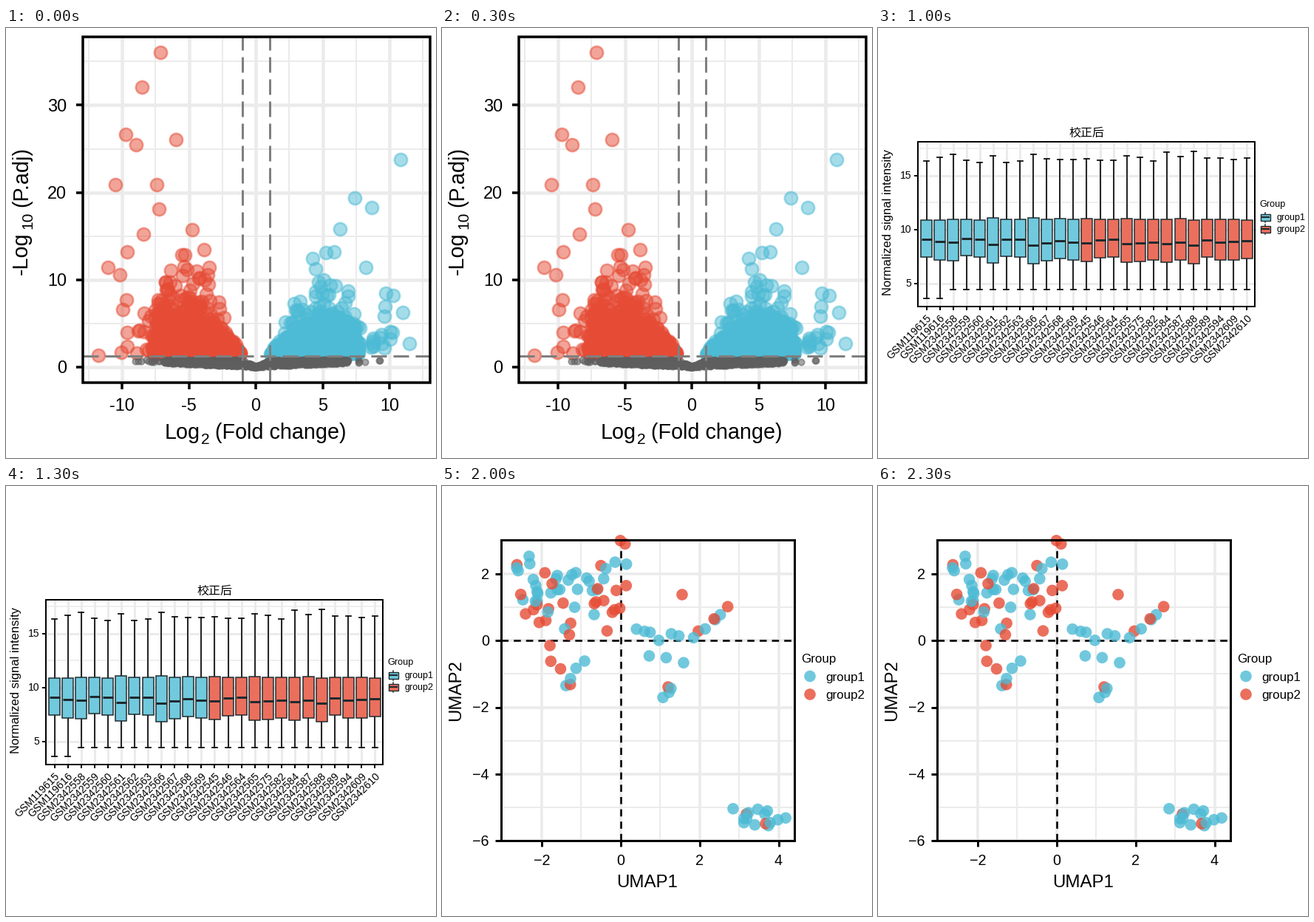
A matplotlib script that plays this animation: 582x582 px, repeating every 2.5 s.

```python
import numpy as np
import matplotlib.pyplot as plt
from matplotlib.animation import FuncAnimation
from matplotlib.colors import LinearSegmentedColormap, to_rgba
from matplotlib.patches import Rectangle

SIZE, DPI = 582, 96
PT = 72 / DPI
RED, BLUE, GRID = "#E64B35", "#4DBBD5", "#EBEBEB"
DIVERGING = LinearSegmentedColormap.from_list("div", [BLUE, "white", RED])

plt.rcParams["font.family"] = "Liberation Sans"
fig = plt.figure(figsize=(SIZE / DPI, SIZE / DPI), dpi=DPI, facecolor="white")


# ---------- helpers, all in pixels with y pointing down ----------
def new_scene():
    ax = fig.add_axes([0, 0, 1, 1], label=f"scene{len(fig.axes)}")
    ax.set_xlim(0, SIZE)
    ax.set_ylim(SIZE, 0)
    ax.axis("off")
    return ax


def line(ax, xs, ys, width, color="black", z=2, **kw):
    ax.plot(xs, ys, color=color, lw=width * PT, zorder=z, **kw)


def text(ax, x, y, s, size, ha="left", **kw):
    ax.text(x, y, s, fontsize=size * PT, ha=ha, va="baseline",
            rotation_mode="anchor", zorder=10, **kw)


def middle(ax, x, cy, s, size, ha="left"):
    text(ax, x, cy + 0.35 * size, s, size, ha)


def rect(ax, x0, y0, x1, y1, face="none", edge="none", width=0, z=3):
    ax.add_patch(Rectangle((x0, y0), x1 - x0, y1 - y0, facecolor=face,
                           edgecolor=edge, lw=width * PT, zorder=z))


def dots(ax, pts, r, face, edge="none", width=0, z=4):
    xs, ys = np.asarray(pts, float).T
    ax.scatter(xs, ys, s=(2 * r * PT) ** 2, facecolors=np.atleast_2d(face),
               edgecolors=edge, linewidths=width * PT, zorder=z)


def along(rng, knots, n, sx, sy):
    """Points strewn along a line through a few knots."""
    xs, ys = np.array(knots, float).T
    t, k = np.linspace(0, len(knots) - 1, n), np.arange(len(knots))
    return np.column_stack([np.interp(t, k, xs) + rng.normal(0, sx, n),
                            np.interp(t, k, ys) + rng.normal(0, sy, n)])


def mixed_dots(ax, rng, blue, red):
    pts = np.vstack([blue, red])
    colors = np.repeat([to_rgba(BLUE, 0.8), to_rgba(RED, 0.8)],
                       [len(blue), len(red)], axis=0)
    order = rng.permutation(len(pts))
    dots(ax, pts[order], 7.8, colors[order])


def grid(ax, box, xs, ys, width):
    x0, y0, x1, y1 = box
    for x in xs:
        line(ax, [x, x], [y0, y1], width, GRID, 1)
    for y in ys:
        line(ax, [x0, x1], [y, y], width, GRID, 1)


def panel(ax, box, border, xticks, yticks, size, tick, gap):
    x0, y0, x1, y1 = box
    rect(ax, *box, edge="black", width=border, z=8)
    for x, label in xticks:
        line(ax, [x, x], [y1, y1 + tick], border, z=8, solid_capstyle="butt")
        if label:
            text(ax, x, y1 + tick + 1.25 * size, label, size, "center")
    for y, label in yticks:
        line(ax, [x0 - tick, x0], [y, y], border, z=8, solid_capstyle="butt")
        middle(ax, x0 - tick - gap, y, label, size, "right")


def ticks(values, origin, step):
    return [(origin + v * step, str(v).replace("-", "\u2212")) for v in values]


def places(values, origin, step):
    return [origin + v * step for v in values]


def group_legend(ax, x, y, title, label_x, label_ys, size):
    middle(ax, x, y, "Group", title)
    for i, ly in enumerate(label_ys):
        middle(ax, label_x, ly, f"group{i + 1}", size)


# ---------- volcano plot ----------
def wing(rng, side, n, peak):
    """One side of the volcano: a dense body and a thin outer fringe."""
    body = 20 + 120 * rng.beta(1.4, 1.2, n)
    height = rng.exponential(peak / 3.6 * np.sin(np.pi * (body - 20) / 150))
    fringe = rng.uniform(125, 185, 22)
    dx = np.append(body, fringe)
    rise = np.append(height, rng.exponential(38, 22))
    return np.column_stack([338 + side * dx, 441 - rise])


def volcano():
    ax, rng = new_scene(), np.random.default_rng(7)
    box = (104, 11.5, 573.5, 480)
    grid(ax, box, places(np.arange(-12.5, 13, 5), 338, 18.1),
         places([5, 15, 25, 35], 459, -11.82), 2)
    xt = [(338 + 18.1 * v, str(v)) for v in (-10, -5, 0, 5, 10)]
    yt = ticks([0, 10, 20, 30], 459, -11.82)
    grid(ax, box, [x for x, _ in xt], [y for y, _ in yt], 4.5)
    panel(ax, box, 3.5, xt, yt, 23.5, 9, 13)

    red = [(209, 33), (184, 80), (162, 144), (176, 158), (230, 151), (148, 212),
           (204, 212), (207, 245), (186, 279), (164, 303), (138, 324), (125, 443)]
    blue = [(534, 178), (472, 230), (495, 243), (452, 272), (433, 304), (444, 303),
            (487, 324), (524, 362), (537, 385), (546, 427)]
    for color, pts in ((RED, red), (RED, wing(rng, -1, 900, 92)),
                       (BLUE, blue), (BLUE, wing(rng, 1, 850, 72))):
        tint = to_rgba(color, 0.5)
        dots(ax, pts, 8.7, tint, tint, 2.6)

    dx = np.append(rng.uniform(-125, 125, 1000), rng.uniform(-168, 168, 60))
    top = np.interp(abs(dx), [0, 20], [458, 449])
    low = 459 - abs(dx) * 0.045
    shade = to_rgba("#5E5E5E", 0.55)
    dots(ax, np.column_stack([338 + dx, top + (low - top) * rng.random(len(dx))]),
         4.2, shade, shade, 1.8, z=5)

    long_dash = dict(color="#7F7F7F", z=6, linestyle=(0, (7, 3)))
    for x in (320, 356.5):
        line(ax, [x, x], [480, 11.5], 3, **long_dash)
    line(ax, [104, 573.5], [443.7, 443.7], 3, **long_dash)

    text(ax, 215, 556, "Log", 28.7)
    text(ax, 264, 563, "2", 21)
    text(ax, 283, 556, "(Fold change)", 28.7)
    text(ax, 29, 334, "-Log", 28.7, rotation=90)
    text(ax, 35.5, 272, "10", 21, rotation=90)
    text(ax, 29, 242, "(P.adj)", 28.7, rotation=90)


# ---------- clustered heatmap ----------
GENES = """SH3GL2 TNNI1 RHCG SLC12A3 FABP1 UMOD CALB1 DPEP1 HSD11B2 HPD LOC149703
GC SERPINC1 XIST DCT RP11\u2212152L20.3 LOC100128176 GIT2 RP11\u2212727A23.1 WBSCR17
CCL20 LOC102659288 NLRP11 CP LINC01127 CXCL5 CXCL6 PARD6B AP1S3 AJAP1 UGT1A6
MACC1 SULT1C4 LTF HAVCR1 USP9Y RPS4Y1 KDM5D FGG FGB""".split()

COL_SPANS = [5, 6, 8, 7]
# row count, noise, then the mean of each column span
BANDS = [
    (11, 0.27, -0.85, -0.85, 1.25, 0.5),
    (2, 0.4, -0.3, -0.7, 1.3, 0.0),
    (2, 0.5, 0.1, 0.4, 0.9, -0.7),
    (5, 0.6, -0.2, 0.3, 0.4, -0.6),
    (8, 0.5, 1.2, -0.4, -0.4, 0.2),
    (7, 0.5, 0.4, -0.8, -0.3, 1.2),
    (3, 0.5, 0.5, -1.0, -0.2, 1.15),
    (2, 0.6, 1.0, 0.0, -0.4, 0.7),
]

# a number is a ladder of that many leaves, a pair joins two branches
COL_TREE = (5, ((2, 4), (8, (3, 4))))
ROW_TREE = (((((1, 4), (2, (2, 2))), 2), (2, 5)),
            (((2, (3, 2)), ((2, 3), 3)), (3, 2)))


def tree(ax, spec, start, height, place):
    """Draw a dendrogram; return its position, height and leaf count."""
    if spec == 1:
        return start, 0, 1
    left, right = (1, spec - 1) if isinstance(spec, int) else spec
    a, ha, n = tree(ax, left, start, height, place)
    b, hb, m = tree(ax, right, start + n, height, place)
    h = height(n + m)
    path = [place(*p) for p in ((a, ha), (a, h), (b, h), (b, hb))]
    line(ax, *zip(*path), 1.8)
    return (a + b) / 2, h, n + m


def heatmap():
    ax, rng = new_scene(), np.random.default_rng(3)
    x0, y0, w, h = 83.5, 76.7, 10.33, 12.475
    rows = np.repeat(BANDS, [b[0] for b in BANDS], axis=0)
    means = np.repeat(rows[:, 2:], COL_SPANS, axis=1)
    values = means + rows[:, 1:2] * rng.normal(size=means.shape)
    ax.pcolormesh(x0 + w * np.arange(27), y0 + h * np.arange(41), values,
                  cmap=DIVERGING, vmin=-2, vmax=2)

    for c in range(26):
        blue = c < 11 or c in (19, 22)
        rect(ax, x0 + w * c, 53.5, x0 + w * (c + 1), 70,
             BLUE if blue else RED, to_rgba("white", 0.3), 0.8)
    tree(ax, COL_TREE, 0, lambda n: 15.7 * n ** 0.336,
         lambda p, d: (x0 + w * (p + 0.5), 50 - d))
    tree(ax, ROW_TREE, 0, lambda n: 8.77 * n ** 0.455,
         lambda p, d: (80 - d, y0 + h * (p + 0.5)))
    for r, gene in enumerate(GENES):
        middle(ax, 358, y0 + h * (r + 0.5), gene, 14.3)

    group_legend(ax, 465, 188, 16.4, 495, (217, 240), 13.9)
    rect(ax, 466, 207, 488, 227.5, BLUE)
    rect(ax, 466, 229.5, 488, 250, RED)
    ax.pcolormesh([465, 486], np.linspace(266, 398, 133),
                  np.linspace(2, -2, 132)[:, None], cmap=DIVERGING)
    for y, label in ticks([2, 1, 0, -1, -2], 331.3, -31.4):
        for x in (465, 482):
            line(ax, [x, x + 4], [y, y], 1.2, "white", 4, solid_capstyle="butt")
        middle(ax, 492, y, label, 14.3)


# ---------- box plots ----------
SAMPLES = """GSM119615 GSM119616 GSM2342558 GSM2342559 GSM2342560 GSM2342561
GSM2342562 GSM2342563 GSM2342566 GSM2342567 GSM2342568 GSM2342569 GSM2342545
GSM2342546 GSM2342564 GSM2342565 GSM2342575 GSM2342582 GSM2342584 GSM2342587
GSM2342588 GSM2342589 GSM2342594 GSM2342609 GSM2342610""".split()


def boxplots():
    ax, rng = new_scene(), np.random.default_rng(11)
    box = (54, 154, 510, 377)
    n = len(SAMPLES)
    xs = 65.5 + 18.08 * np.arange(n)
    # one skew per sample moves its median, lower quartile and upper whisker
    skew = rng.uniform(-1.5, 1.5, n)
    high = 176.5 - 5 * skew + rng.normal(0, 3, n)
    upper = 258.7 + rng.normal(0, 1, n)
    median = 289.5 + 3 * skew
    lower = 313.7 + 3.7 * skew
    low = np.where(np.arange(n) < 2, 365.5, 354.3)

    yt = ticks([5, 10, 15], 418.5, -14.6)
    grid(ax, box, [], [163, 236, 309], 1.5)
    grid(ax, box, xs, [y for y, _ in yt], 3)
    panel(ax, box, 2, [(x, "") for x in xs], yt, 14, 5, 3.5)

    fills, ink = ("#71C9DD", "#EB6F5D"), "#1F2A2E"
    for i, x in enumerate(xs):
        for tip, hinge in ((high[i], upper[i]), (low[i], lower[i])):
            line(ax, [x, x], [tip, hinge], 1.8, "#111111", 3)
            line(ax, [x - 3.5, x + 3.5], [tip, tip], 1.8, "#111111", 3)
        rect(ax, x - 7.5, upper[i], x + 7.5, lower[i], fills[i > 11], ink, 1.5, 4)
        line(ax, [x - 7, x + 7], [median[i]] * 2, 3, ink, 5, solid_capstyle="butt")
        text(ax, x + 7, 393, SAMPLES[i], 14.1, "right", rotation=45)

    text(ax, 282, 146.7, "校正后", 16, "center", family="Noto Sans CJK JP")
    text(ax, 18, 362, "Normalized signal intensity", 16.5, rotation=90)
    group_legend(ax, 516, 238, 12.6, 539, (256, 272), 12.5)
    for y, fill in zip((256, 272), fills):
        line(ax, [524, 524], [y - 6.5, y + 6.5], 1.5, ink)
        rect(ax, 517.5, y - 4.5, 530.5, y + 4.5, fill, ink, 1.4, 3)
        line(ax, [518, 530], [y, y], 2.2, ink, 4, solid_capstyle="butt")


# ---------- PCA ----------
def ellipse(ax, cx, cy, w, h, lean, color):
    t = np.linspace(0, 2 * np.pi, 240)
    xs, ys = cx + w * np.cos(t), cy - h * np.cos(t - np.arccos(lean))
    ax.fill(xs, ys, facecolor=to_rgba(color, 0.1), lw=0, zorder=3)
    line(ax, xs, ys, 2.6, color, 3.5)


def pca():
    ax, rng = new_scene(), np.random.default_rng(5)
    box = (102.5, 70, 477, 478)
    xt = ticks([-100, 0, 100], 304.5, 1.005)
    yt = ticks([-100, -50, 0, 50, 100], 291.5, -1.86)
    grid(ax, box, places([-150, -50, 50, 150], 304.5, 1.005),
         places([-75, -25, 25, 75], 291.5, -1.86), 2)
    grid(ax, box, [x for x, _ in xt], [y for y, _ in yt], 3.6)
    panel(ax, box, 3, xt, yt, 19.8, 8, 7)
    ellipse(ax, 315, 305.5, 131, 116.5, -0.27, BLUE)
    ellipse(ax, 289.8, 272.5, 170.3, 184.5, 0.31, RED)

    blue = np.vstack([
        along(rng, [(240, 248), (275, 283), (325, 310), (380, 342)], 34, 8, 11),
        along(rng, [(277, 245), (325, 251), (390, 229)], 5, 3, 3),
        [(205, 216), (190, 235), (200, 367), (266, 395), (276, 427), (291, 418),
         (328, 359), (403, 354)]])
    red = np.vstack([
        along(rng, [(190, 235), (245, 245)], 10, 5, 9),
        along(rng, [(250, 193), (320, 208), (370, 224), (415, 242)], 12, 5, 6),
        along(rng, [(253, 275), (337, 291), (365, 277)], 7, 4, 6),
        along(rng, [(185, 418), (238, 432)], 4, 3, 3),
        [(244, 191), (305, 226), (273, 397), (307, 397), (341, 322)]])
    mixed_dots(ax, rng, blue, red)

    text(ax, 290, 541, "PC1 (12.3%)", 24, "center")
    text(ax, 25, 274, "PC2 (3.7%)", 24, "center", rotation=90)
    group_legend(ax, 486, 231, 17, 519, (256, 281), 17)
    for y, color in ((255, BLUE), (280.5, RED)):
        rect(ax, 488, y - 10, 508, y + 10, to_rgba(color, 0.12), color, 2.4)
        dots(ax, [(498, y)], 6.6, to_rgba(color, 0.1), color, 2.4)


# ---------- UMAP ----------
def umap():
    ax, rng = new_scene(), np.random.default_rng(9)
    box = (80, 73, 477, 480)
    xt = ticks([-2, 0, 2, 4], 241.7, 53.45)
    yt = ticks([-6, -4, -2, 0, 2], 209.2, -45.15)
    grid(ax, box, places([-1, 1, 3], 241.7, 53.45),
         places([-5, -3, -1, 1], 209.2, -45.15), 2)
    grid(ax, box, [x for x, _ in xt], [y for y, _ in yt], 3.6)
    panel(ax, box, 3, xt, yt, 19.8, 8, 8)
    dash = dict(z=3, linestyle=(0, (3.7, 2.7)))
    line(ax, [241.7, 241.7], [480, 73], 2.6, **dash)
    line(ax, [80, 477], [209.2, 209.2], 2.6, **dash)

    blue = np.vstack([
        along(rng, [(105, 140), (150, 145), (215, 150)], 29, 5, 25),
        along(rng, [(222, 111), (249, 101)], 3, 2, 2),
        along(rng, [(167, 270), (194, 235)], 4, 4, 4),
        along(rng, [(268, 192), (293, 203), (341, 204), (380, 170)], 10, 3, 3),
        along(rng, [(279, 230), (326, 237)], 3, 1, 1),
        along(rng, [(300, 286), (310, 273)], 3, 1, 1),
        along(rng, [(396, 450), (459, 450)], 13, 4, 7)])
    red = np.vstack([
        along(rng, [(100, 162), (172, 150)], 13, 5, 28),
        along(rng, [(205, 150), (250, 165)], 13, 5, 32),
        along(rng, [(140, 217), (172, 267)], 4, 3, 3),
        along(rng, [(349, 196), (386, 163)], 3, 1, 1),
        [(325, 147), (306, 272), (412, 444), (438, 457)]])
    mixed_dots(ax, rng, blue, red)

    text(ax, 278, 543, "UMAP1", 24, "center")
    text(ax, 25, 276.5, "UMAP2", 24, "center", rotation=90)
    group_legend(ax, 486, 233, 17, 519, (258, 282.5), 17)
    dots(ax, [(498, 257.5)], 7.8, to_rgba(BLUE, 0.8))
    dots(ax, [(498, 282)], 7.8, to_rgba(RED, 0.8))


for build in (volcano, heatmap, boxplots, pca, umap):
    build()
scenes = list(fig.axes)


def show(k):
    for i, ax in enumerate(scenes):
        ax.set_visible(i == k)
    return scenes


show(0)
anim = FuncAnimation(fig, show, frames=len(scenes), interval=500,
                     repeat=True, repeat_delay=0, blit=False)
plt.show()
```
